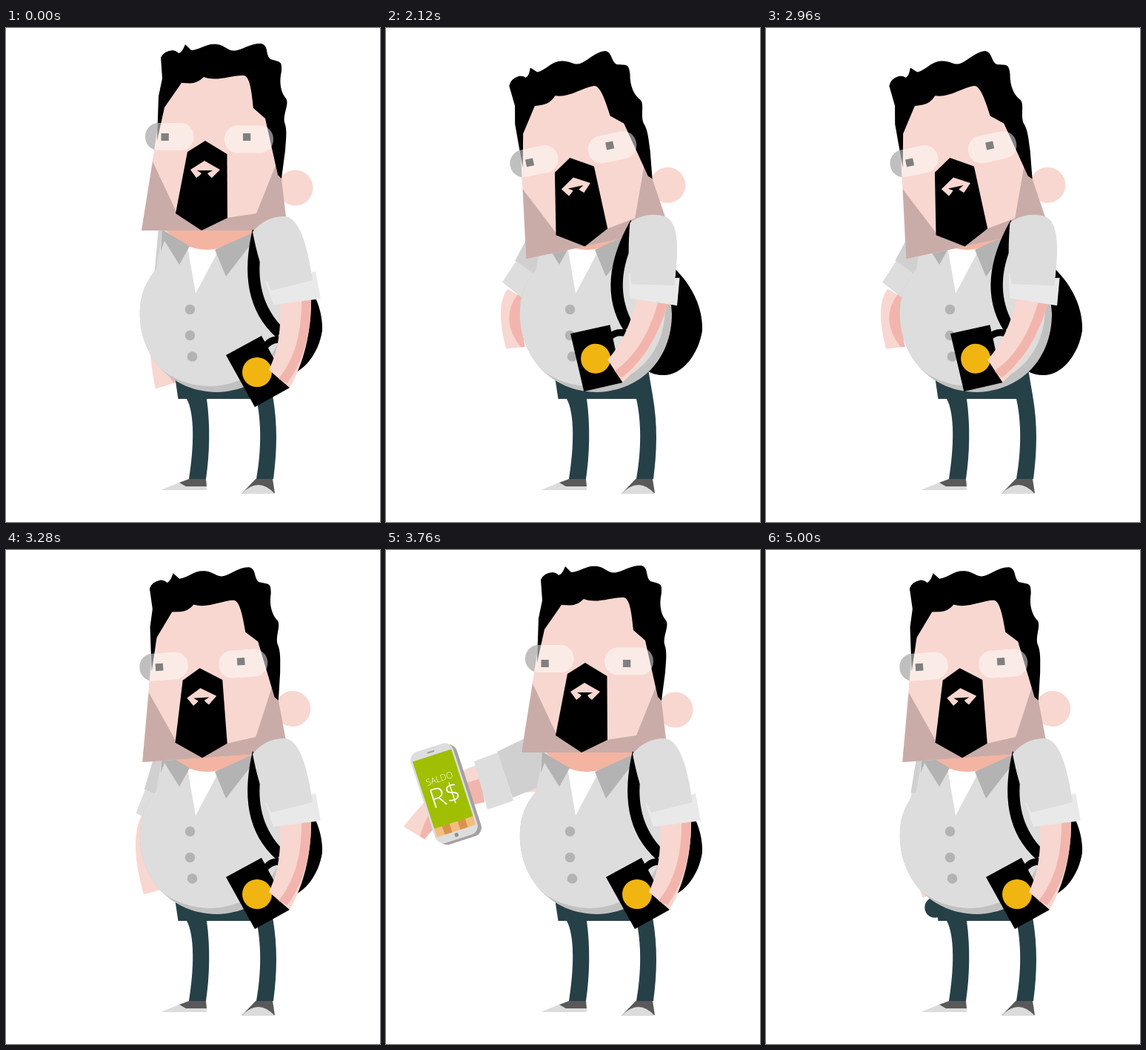
An HTML page with a canvas for the animation above (10000 ms loop, 505 by 666 pixels).

```html
<!DOCTYPE html>
<html lang="pt">
<head>
<meta charset="utf-8">
<title>Saldo</title>
<style>
html, body { margin: 0; width: 100%; height: 100%; overflow: hidden; background: #fff; }
canvas { display: block; }
</style>
</head>
<body>
<canvas id="stage" width="505" height="666"></canvas>
<script>
const ctx = document.getElementById('stage').getContext('2d');
const LOOP = 10000, STEP = 40;
const SKIN = '#f8d7d0', BLUSH = '#f2b5ad', SHIRT = '#dddddd', FOLD = '#c1c1c1',
      GREY = '#b3b3b3', TEAL = '#264047';

// time, head tilt, mug arm, phone arm, forearm, forearm length, eye height, eye drop
const KEYS = [
  [0, 0, 0, -59, 10, 1, 1, 0],
  [1960, 0, 0, -59, 10, 1, 1, 0],
  [2000, -4, 0, -42, 1, 1, .55, 0],
  [2040, -8, 5, -37, 2, 1, .1, 0],
  [2080, -12, 11, -36, -3, .8, .55, 0],
  [2120, -12, 16, -36.4, -8, .61, 1, 0],
  [3000, -12, 16, -36.4, -8, .61, 1, 0],
  [3120, -4, 0, -41, -4, .75, 1, 0],
  [3280, -4, 0, -47.7, -2.4, .82, 1, 0],
  [3480, -4, 0, -55, -2, .83, 1, 0],
  [3760, 0, 0, 0, 0, 1, 1, 6],
  [4720, 0, 0, 0, 0, 1, 1, 6],
  [5000, -4, 0, -55, -2, .83, 1, 0],
  [LOOP, -4, 0, -55, -2, .83, 1, 0]
];

function poseAt(t) {
  let i = 0;
  while (i < KEYS.length - 2 && t >= KEYS[i + 1][0]) i++;
  const a = KEYS[i], b = KEYS[i + 1], u = (t - a[0]) / (b[0] - a[0]);
  const [, head, mug, arm, fore, len, eye, drop] = a.map((v, n) => v + (b[n] - v) * u);
  const scratch = t > 2120 && t < 2960 ? 6 * Math.sin((t - 2120) / 280 * 2 * Math.PI) : 0;
  return {
    head, mug, arm, fore: fore + scratch, len, eye, drop,
    phone: t > 3480 && t < 5000,
    pocket: (t >= 3440 && t < 3520) || t >= 4960
  };
}

function fill(color, d) {
  ctx.fillStyle = color;
  ctx.fill(new Path2D(d));
}

function dot(color, x, y, r) {
  ctx.fillStyle = color;
  ctx.beginPath();
  ctx.arc(x, y, r, 0, 7);
  ctx.fill();
}

function pill(color, x, y, w, h, r) {
  ctx.fillStyle = color;
  ctx.beginPath();
  ctx.roundRect(x, y, w, h, r);
  ctx.fill();
}

function spin(x, y, deg) {
  ctx.translate(x, y);
  ctx.rotate(deg * Math.PI / 180);
  ctx.translate(-x, -y);
}

function group(draw) {
  ctx.save();
  draw();
  ctx.restore();
}

function label(text, size, y) {
  ctx.font = `300 ${size}px "Open Sans", sans-serif`;
  ctx.fillText(text, 0, y);
}

function drawPhone() {
  group(() => {
    ctx.translate(67, 279);
    ctx.rotate(-Math.PI / 10);
    pill('#a3a1a1', -30, -11, 60, 129, 12);
  });
  group(() => {
    ctx.translate(62, 277);
    ctx.rotate(-Math.PI / 10);
    pill(SHIRT, -30, -11, 60, 129, 12);
    pill('#a3a1a1', -5, -6, 10, 2, 1);
    ctx.fillStyle = '#9fbf00';
    ctx.fillRect(-27.5, 0, 55, 95.5);
    for (let i = 0; i < 5; i++) {
      ctx.fillStyle = i % 2 ? '#d9924a' : '#f3bd80';
      ctx.fillRect(-27.5 + i * 11, 95, 11, 12);
    }
    dot('#8f8f8f', -1.4, 112, 2.7);
    ctx.fillStyle = '#fff';
    ctx.textAlign = 'center';
    label('SALDO', 12, 37);
    label('R$', 36, 69);
  });
}

function drawPhoneArm(p) {
  group(() => {
    spin(226, 256, p.arm);
    group(() => {
      const axis = -27.9;
      spin(128, 318, p.fore + axis);
      ctx.translate(128, 318);
      ctx.scale(p.len, .6 + .4 * p.len);
      ctx.translate(-128, -318);
      spin(128, 318, -axis);
      fill(SKIN, 'M124 290Q80 300 24 373L52 390Q84 348 133 340Z');
      fill(BLUSH, 'M128 308Q62 325 46 386L52 390Q84 348 133 340Z');
      if (p.phone) drawPhone();
    });
    if (p.phone) fill(SKIN, 'M183 327L204 316V326Z');
    fill('#d0d0d0', 'M226 235L185 255L150 272L171 334L215 316Z');
    fill(SHIRT, 'M151 273L119 285L137 350L172 338Z');
  });
}

function drawLegs(p) {
  fill(TEAL, 'M228 470L232.500 500H244C255 520 254 565 247 608H270C275 575 276 535 271 500' +
    'H338C345 530 345 570 338 608H361C366 570 367 535 360 495L354 460Z');
  if (p.pocket) dot(TEAL, 228, 482, 13.7);
  fill('#dcdcdc', 'M209 623L238 611L244 617H271V623Z');
  fill('#595959', 'M247 608H270L271 618H243L234 613Z');
  fill('#595959', 'M337 608H360L363 627L318 628Z');
  fill('#dcdcdc', 'M318 628Q341 604 363 628Z');
}

function drawShirt() {
  const d = 'M212 272L203 325C185 347 180 365 181 392C184 444 222 490 285 491' +
    'C345 489 386 446 386 385C384 340 362 292 335 275Z';
  group(() => {
    fill(FOLD, d);
    ctx.clip(new Path2D(d));
    ctx.fillStyle = SHIRT;
    ctx.fillRect(195, 265, 135, 80);
    ctx.translate(-9, -8);
    fill(SHIRT, d);
  });
  fill('#fff', 'M244 288L288 298L256 358Z');
  fill('#f4b4a2', 'M212 268Q238 299 272 299Q308 297 334 276V262H212Z');
  fill(GREY, 'M211 272L248 294L234 319L214 287L209 301Z');
  fill(GREY, 'M333 276L282 299L297 335L331 291Z');
  dot(GREY, 248.5, 379.5, 6.8);
  dot(GREY, 248.5, 414.5, 6.8);
  dot(GREY, 251.5, 443, 6.8);
}

function drawLenses(color) {
  pill(color, 188, 128, 65.5, 37, 18);
  pill(color, 295, 131.5, 66, 37, 18);
}

function drawHead(p) {
  group(() => {
    spin(368, 262, p.head);
    dot(SKIN, 390.5, 215.5, 24);
    drawLenses('#bfbfbf');
    fill(SKIN, 'M206 95L204 140L183 273H380L372 200L360 60H230Z');
    fill('#c9aca8', 'M198 180L231 250L264 262L298 256L338 250L365 183L372 203L380 273H183Z');
    fill('#000', 'M204 152L205 122L206 92L211 68L209 40Q213 31 225 30Q231 31 233 34Q238 33 242 22' +
      'L250 30C264 29 270 20 285 22C298 24 300 33 312 30C325 26 333 20 345 21' +
      'C355 24 350 36 357 42C370 46 373 44 372 58C368 75 372 88 378 95' +
      'C383 102 374 115 376 127C380 137 378 150 377 165L372 203L367 198L350 122L334 108' +
      'C332 90 330 65 321 64C305 63 285 73 267 66Q258 75 248 74.500L237 74L214 107Z');
    fill('#000', 'M269 152L298.500 170L299 256L264 273L229 250L245 167Z');
    fill(SKIN, 'M249 191L268 179L289 191L278 202L272 197H264L257 202Z');
    fill('#000', 'M258 192H279L272 196L277 203H258L264 196Z');
    group(() => {
      ctx.clip(new Path2D('M206 95L204 140L183 273H380V95Z'));
      drawLenses('rgba(255,255,255,.5)');
    });
    ctx.fillStyle = '#808080';
    for (const x of [209.5, 320]) ctx.fillRect(x, 152 + p.drop - 10 * p.eye, 10.3, 10 * p.eye);
  });
}

function drawMugArm(p) {
  group(() => {
    spin(376, 256, p.mug);
    fill('#000', 'M333 271C319 330 325 382 366 418L374 404C348 378 340 345 343 312L338 280Z');
    ctx.strokeStyle = '#000';
    ctx.lineWidth = 9;
    ctx.stroke(new Path2D('M349 431Q357 417 376 421'));
    fill('#000', 'M297 441L345 415L383 485L336 511Z');
    dot('#f0b511', 339, 464, 20);
    fill(SKIN, 'M370 365C372 410 367 436 355 461L383 485C402 452 413 410 412 360Z');
    fill(BLUSH, 'M399 362C400 410 390 446 368 473L380 479C402 448 413 410 412 360Z');
    fill('#e9e9e9', 'M350 341L412 330L418 328L425 365L361 373Z');
    fill(SHIRT, 'M333 275C345 259 363 253 378 254C400 259 408 304 414 340L358 354C345 329 338 300 333 275Z');
  });
}

function draw(t) {
  const p = poseAt(t);
  ctx.fillStyle = '#fff';
  ctx.fillRect(0, 0, 505, 666);
  fill('#000', 'M360 300C412 335 428 375 427 408C422 440 400 468 375 468Q362 468 354 463Z');
  drawPhoneArm(p);
  drawLegs(p);
  drawShirt();
  drawHead(p);
  drawMugArm(p);
}

const start = performance.now();
function tick() {
  const t = (performance.now() - start) % LOOP;
  draw(Math.floor(t / STEP) * STEP);
  requestAnimationFrame(tick);
}
tick();
</script>
</body>
</html>
```
